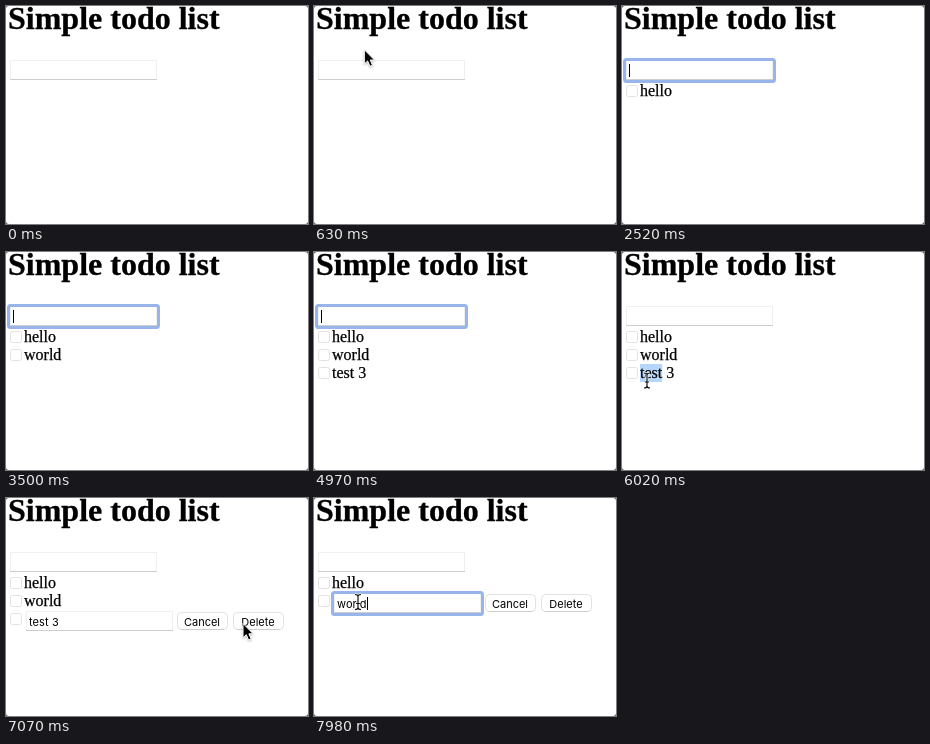
Animation of 302x218 px, one loop 8000 ms. Source, as an HTML page:

```html
<!DOCTYPE html>
<html lang="en">
<head>
<meta charset="utf-8">
<title>Simple todo list</title>
<style>
  html, body { margin: 0; width: 100%; height: 100%; overflow: hidden; background: #fff; }
  svg { display: block; width: 302px; height: 218px; }
  .serif { font: 16px "Liberation Serif", serif; stroke: #000; stroke-width: .25; }
  .title { font: bold 32px "Liberation Serif", serif; stroke: #000; stroke-width: .3; }
  .ui { font: 11px Inter, sans-serif; }
  .typed { letter-spacing: .1px; }
  .mid { text-anchor: middle; }
  .box { fill: #fff; stroke: #f0f0f0; }
  .under { stroke: #cecece; }
  .check, .button { fill: #fff; stroke: #e2e2e2; }
  .ring { fill: none; stroke: #97b5ea; stroke-width: 3; }
  .mark { fill: #b7d6fb; }
  .halo { fill: none; stroke: #fff; stroke-width: 2.6; }
  .beam { fill: none; stroke: #111; stroke-width: 1.2; }
  .arrow { stroke: #fff; stroke-linejoin: round; filter: drop-shadow(0 1px 1px #0004); }
</style>
</head>
<body>
<svg id="stage" viewBox="0 0 302 218"></svg>
<script>
const LOOP = 8000, STEP = 70, PITCH = 18, BLINK = 490;
const stage = document.getElementById('stage');

function add(parent, tag, attrs = {}, text) {
  const node = document.createElementNS('http://www.w3.org/2000/svg', tag);
  for (const key in attrs) node.setAttribute(key, attrs[key]);
  if (text) node.textContent = text;
  return parent.appendChild(node);
}
const show = (node, on) => { node.style.display = on ? '' : 'none'; };
const move = (node, x, y) => node.setAttribute('transform', `translate(${x} ${y})`);
const snap = t => Math.round(t / STEP) * STEP;
const between = (t, a, b) => t >= a && t < b;
const blinkOn = (t, since) => (t - since) % 1000 < BLINK;

// Text field whose top left corner is the group's origin
function field(parent, x, y) {
  const g = add(parent, 'g');
  move(g, x, y);
  add(g, 'rect', { class: 'box', x: .5, y: -.5, width: 146, height: 19 });
  add(g, 'path', { class: 'under', d: 'M0 18.5H147' });
  const ring = add(g, 'rect', { class: 'ring', x: -1.5, y: -1.5, width: 150, height: 22, rx: 2 });
  const text = add(g, 'text', { class: 'ui typed', x: 3, y: 14 });
  const caret = add(g, 'rect', { y: 3, width: 1, height: 13 });
  return (value, focused, blink) => {
    text.textContent = value;
    show(ring, focused);
    show(caret, focused && blink);
    caret.setAttribute('x', 3 + Math.round(value ? text.getComputedTextLength() : 0));
  };
}

function button(parent, x, label) {
  add(parent, 'rect', { class: 'button', x: x + .5, y: 114.5, width: 50, height: 17, rx: 4 });
  add(parent, 'path', { class: 'under', d: `M${x + 4} 131.5h43` });
  add(parent, 'text', { class: 'ui mid', x: x + 25, y: 127.5 }, label);
}

add(stage, 'text', { class: 'title', x: 2, y: 23 }, 'Simple todo list');
const setEntry = field(stage, 4, 55);

const FOCUS = 770, BLUR = 5740, EDIT = 6090, DELETE = 7070, REOPEN = 7980;

// Keys are spread evenly from first to last
const todos = [
  { word: 'hello', first: 1680, last: 2240, enter: 2520, picked: 'hello' },
  { word: 'world', first: 2870, last: 3360, enter: 3500, picked: 'world', from: 7840, to: REOPEN },
  { word: 'test 3', first: 3990, last: 4830, enter: 4970, picked: 'test', from: 6020, to: EDIT }
];

todos.forEach((todo, i) => {
  const { word, first, last, picked } = todo, y = 79 + i * PITCH;
  const gap = (last - first) / (word.length - 1);
  todo.keys = [...word].map((_, n) => snap(first + n * gap));
  todo.row = add(stage, 'g');
  add(todo.row, 'rect', { class: 'check', x: 4.5, y: y + .5, width: 11, height: 11, rx: 2 });
  todo.mark = add(todo.row, 'rect', { class: 'mark', x: 18, y: y - 3, height: PITCH });
  todo.label = add(todo.row, 'text', { class: 'serif', x: 18, y: y + 11 }, picked);
  todo.mark.setAttribute('width', todo.label.getComputedTextLength());
  todo.label.textContent = word;
});
const resets = [FOCUS, ...todos.flatMap(todo => [...todo.keys, todo.enter])];

const editor = add(stage, 'g');
const setEdit = field(editor, 20, 114);
button(editor, 171, 'Cancel');
button(editor, 227, 'Delete');

const arrow = add(stage, 'path', { class: 'arrow', d: 'M0 0V14.2L3.3 11.2L5.6 16.6L8.2 15.5L5.9 10.3H10.2Z' });
const beam = add(stage, 'g');
const beamPath = 'M-3 -7.5Q0 -7.5 0 -5.5V5.5Q0 7.5 -3 7.5M3 -7.5Q0 -7.5 0 -5.5M0 5.5Q0 7.5 3 7.5M-2 1.5H2';
for (const name of ['halo', 'beam']) add(beam, 'path', { class: name, d: beamPath });

// Rounded window corners
add(stage, 'path', {
  fill: '#555', 'fill-rule': 'evenodd',
  d: 'M0 0H302V218H0ZM3 0Q0 0 0 3V215Q0 218 3 218H299Q302 218 302 215V3Q302 0 299 0Z'
});

// Each leg eases from where the last one ended, bowed vertically by bend
const home = { x: 70, y: 165 };
const legs = [
  { start: 140, end: FOCUS, x: 47.5, y: 63, bend: -50 },
  { start: 5250, end: BLUR, x: 7, y: 129, bend: 0 },
  { start: 5810, end: 6020, x: 25, y: 128.5, bend: 0 },
  { start: 6230, end: DELETE, x: 237, y: 125.5, bend: -16 },
  { start: DELETE, end: 7840, x: 44, y: 94, bend: 0 },
  { start: 7840, end: REOPEN, x: 44, y: 104, bend: 0 }
];

function pointer(t) {
  let { x, y } = home;
  for (const leg of legs) {
    const k = Math.min(1, Math.max(0, (t - leg.start) / (leg.end - leg.start)));
    const eased = k * k * (3 - 2 * k);
    x += (leg.x - x) * eased;
    y += (leg.y - y) * eased + leg.bend * Math.sin(Math.PI * k);
  }
  return { x, y };
}

const inside = ({ x, y }, l, t, r, b) => x >= l && x <= r && y >= t && y <= b;

function overText(p, t) {
  if (inside(p, 4, 54, 151, 74)) return true;
  if (between(t, EDIT, DELETE + STEP)) return inside(p, 20, 113, 167, 133);
  return t > BLUR - 500 && inside(p, 18, 76, 54, 130);
}

function render(now) {
  const t = Math.floor(now % LOOP / STEP) * STEP;
  const editing = t >= REOPEN ? 1 : between(t, EDIT, DELETE + STEP) ? 2 : -1;

  const typing = todos.find(todo => between(t, todo.first, todo.enter));
  const value = typing ? typing.word.slice(0, typing.keys.filter(k => k <= t).length) : '';
  const reset = Math.max(...resets.filter(k => k <= t));
  setEntry(value, between(t, FOCUS, BLUR), blinkOn(t, reset));

  todos.forEach(({ row, mark, label, enter, from, to }, i) => {
    show(row, t >= enter && !(i === 2 && t > DELETE));
    show(label, editing !== i);
    show(mark, between(t, from, to));
  });

  show(editor, editing >= 0);
  if (editing >= 0) {
    move(editor, 0, (editing - 2) * PITCH);
    setEdit(todos[editing].word, t !== DELETE, blinkOn(t, todos[editing].to));
  }

  const p = pointer(t), text = overText(p, t);
  const visible = between(t, 140, 1610) || t >= 5320;
  show(beam, visible && text);
  show(arrow, visible && !text);
  move(text ? beam : arrow, p.x, p.y);
}

const begin = performance.now();
function tick() {
  render(performance.now() - begin);
  requestAnimationFrame(tick);
}
render(0);
requestAnimationFrame(tick);
</script>
</body>
</html>
```
